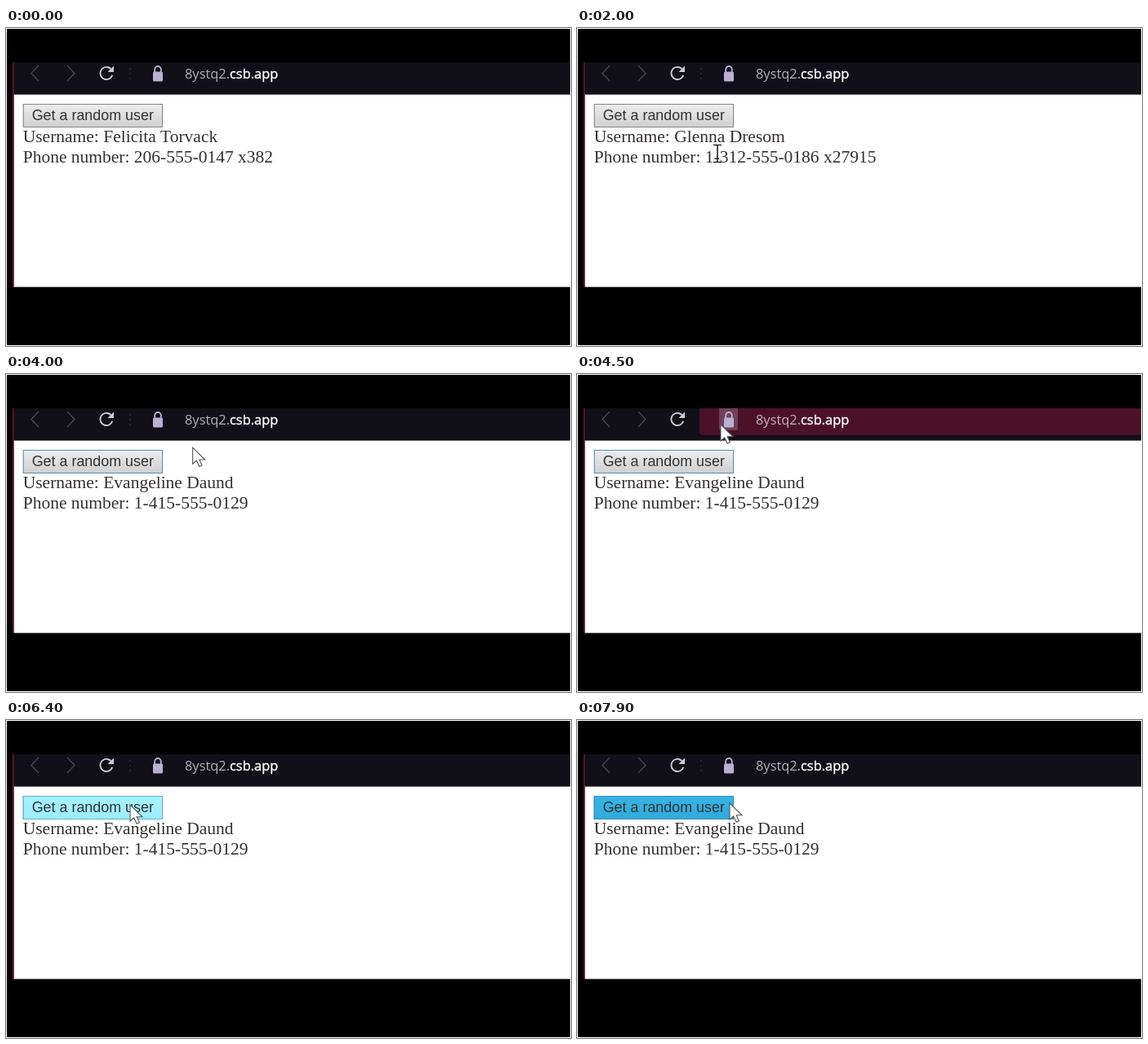
These frames come from a looping animation (692 px wide and 390 px high, 8 s). An HTML page with a canvas:

```html
<!DOCTYPE html>
<html lang="en">
<head>
<meta charset="utf-8">
<title>Random user</title>
<style>
  html, body { margin: 0; width: 100%; height: 100%; overflow: hidden; background: #fff; }
  canvas { display: block; }
</style>
</head>
<body>
<canvas id="stage" width="692" height="390"></canvas>
<script>
const ctx = document.getElementById('stage').getContext('2d');
const LOOP = 8000, STEP = 100;
const SERIF = '21.5px "Liberation Serif", serif';
const SANS = '17.9px "Liberation Sans", sans-serif';
const URL_FONT = '16.4px "Open Sans", sans-serif';
const INK = '#353130';

const users = [
  { from: 0, name: 'Felicita Torvack', phone: '206-555-0147 x382' },
  { from: 1900, name: 'Glenna Dresom', phone: '1-312-555-0186 x27915' },
  { from: 2700, name: 'Evangeline Daund', phone: '1-415-555-0129' }
];
const clicks = [1700, 2500, 6800, 7300, 7900];

// where the pointer turns or rests: time, x, y
const stops = [
  [100, 287, 137], [200, 150, 108], [1100, 150, 108], [1200, 129, 114],
  [1400, 135, 144], [1700, 150, 112], [2000, 172, 154], [2500, 160, 112],
  [3300, 316, 137], [4500, 176, 62], [4900, 118, 56], [5400, 118, 56],
  [5650, 290, 210], [5900, 158, 110], [6400, 152, 104], [7400, 185, 116],
  [7900, 187, 102]
];

function pointer(t) {
  const i = stops.findIndex(s => s[0] >= t);
  if (i < 1) return { x: stops[0][1], y: stops[0][2] };
  const [t0, x0, y0] = stops[i - 1], [t1, x1, y1] = stops[i];
  const k = (t - t0) / (t1 - t0);
  const ease = k * k * (3 - 2 * k);
  return { x: x0 + (x1 - x0) * ease, y: y0 + (y1 - y0) * ease };
}

function inside(t, left, top, right, bottom) {
  const { x, y } = pointer(t);
  return t >= 100 && x > left && x < right && y > top && y < bottom;
}
const onButton = t => inside(t, 21, 93, 192, 122);

// fades in over three steps, ends at once
function hoverLevel(t) {
  if (!onButton(t)) return 0;
  return [0, 1, 2].filter(n => onButton(t - n * STEP)).length / 3;
}

function pressLevel(t) {
  if (!onButton(t)) return 0;
  return Math.max(0, ...clicks.map(c => 1 - Math.abs(t - c) / 200));
}

function rect(color, x, y, w, h) {
  ctx.fillStyle = color;
  ctx.fillRect(x, y, w, h);
}

function roundRect(color, x, y, w, h, radii) {
  ctx.beginPath();
  ctx.roundRect(x, y, w, h, radii);
  ctx.fillStyle = color;
  ctx.fill();
}

function text(str, x, y, font, color) {
  ctx.font = font;
  ctx.fillStyle = color;
  ctx.fillText(str, x, y);
  return ctx.measureText(str).width;
}

function trace(points) {
  ctx.beginPath();
  points.forEach(([x, y]) => ctx.lineTo(x, y));
}

function stroke(color, width) {
  ctx.strokeStyle = color;
  ctx.lineWidth = width;
  ctx.stroke();
}

function drawChevron(x, dir) {
  trace([[x, 46], [x - 9 * dir, 55.5], [x, 65]]);
  stroke('#45424f', 1.5);
}

function drawReload(color) {
  ctx.beginPath();
  ctx.arc(123, 55.5, 7.6, 0.3, Math.PI * 1.75);
  stroke(color, 1.9);
  trace([[132, 46.5], [132, 54], [124.5, 54]]);
  ctx.fillStyle = color;
  ctx.fill();
}

function drawLock() {
  ctx.beginPath();
  ctx.moveTo(182.2, 56);
  ctx.arc(186, 50.8, 3.8, Math.PI, 0);
  ctx.lineTo(189.8, 56);
  stroke('#bcb0d2', 1.8);
  roundRect('#bcb0d2', 180, 53.5, 12, 12, 1.5);
}

function drawToolbar(t) {
  const barHover = inside(t, 150, 0, 691, 76);
  rect('#110f18', 10, 42, 681, 39.4);
  if (barHover) {
    roundRect('#4b1227', 150, 42, 541, 33, [0, 0, 0, 4]);
    if (inside(t, 174, 0, 198, 70)) roundRect('#70405a', 174, 42, 23, 27, [0, 0, 3, 3]);
  } else {
    for (let y = 49; y < 62; y += 6) rect('#25232d', 151, y, 2, 2);
  }
  drawChevron(40, 1);
  drawChevron(75, -1);
  drawReload(inside(t - 200, 114, 45, 134, 65) ? '#fff' : '#cfccd8');
  drawLock();
  const w = text('8ystq2.', 219, 62, URL_FONT, barHover ? '#c4b1ba' : '#b3b0ba');
  text('csb.app', 219 + w, 62, URL_FONT, '#fff');
  ctx.strokeStyle = '#fff';
  ctx.lineWidth = 0.4;
  ctx.strokeText('csb.app', 219 + w, 62);
}

function drawFace(top, bottom, border, alpha) {
  const fill = ctx.createLinearGradient(0, 94, 0, 121);
  fill.addColorStop(0, top);
  fill.addColorStop(1, bottom);
  ctx.globalAlpha = alpha;
  rect(border, 20.7, 93, 171.3, 29);
  rect(fill, 21.8, 94, 169.2, 27);
  ctx.globalAlpha = 1;
}

function drawButton(t) {
  drawFace('#ececec', '#d0d0d0', t < 2700 ? '#85868a' : '#5a8db5', 1);
  drawFace('#a6f3ff', '#9decfd', '#66aec4', hoverLevel(t));
  drawFace('#38b4e4', '#30aadc', '#3390b8', pressLevel(t));
  text('Get a random user', 31.7, 113.3, SANS, '#333');
}

function drawArrow(x, y) {
  trace([[0, 0], [0, 20], [4.7, 16], [8.2, 23.3], [11.4, 21.8], [8.2, 14.8], [15, 14.8]]
    .map(([dx, dy]) => [x + dx, y + dy]));
  ctx.closePath();
  ctx.fillStyle = '#fff';
  ctx.fill();
  stroke('#55555c', 1.1);
}

function drawBeam(x, y) {
  trace([[x, y - 10], [x, y + 10]]);
  stroke('#222', 1.6);
  for (const end of [-10.5, 10.5]) {
    trace([[x - 5, y + end], [x + 5, y + end]]);
    stroke('#222', 1.4);
  }
}

function draw(t) {
  const { x, y } = pointer(t);
  const user = users.filter(u => t >= u.from).pop();

  rect('#fff', 0, 0, 692, 390);
  rect('#000', 1, 1, 690, 388);
  rect('#fff', 9.6, 81.4, 681.4, 236.2);
  rect('#7d1c3d', 8.2, 42, 1.4, 275.6);
  drawToolbar(t);
  drawButton(t);

  const widths = [
    text('Username: ' + user.name, 20.7, 140.4, SERIF, INK),
    text('Phone number: ' + user.phone, 20.7, 164.5, SERIF, INK)
  ];
  if (t < 100) return;
  const row = Math.floor((y - 122) / 24);
  const overText = x > 20 && x < 20.7 + (widths[row] || 0);
  (overText ? drawBeam : drawArrow)(x, y);
}

function frame() {
  const t = performance.now() % LOOP;
  draw(Math.floor(t / STEP) * STEP);
  requestAnimationFrame(frame);
}
frame();
</script>
</body>
</html>
```
